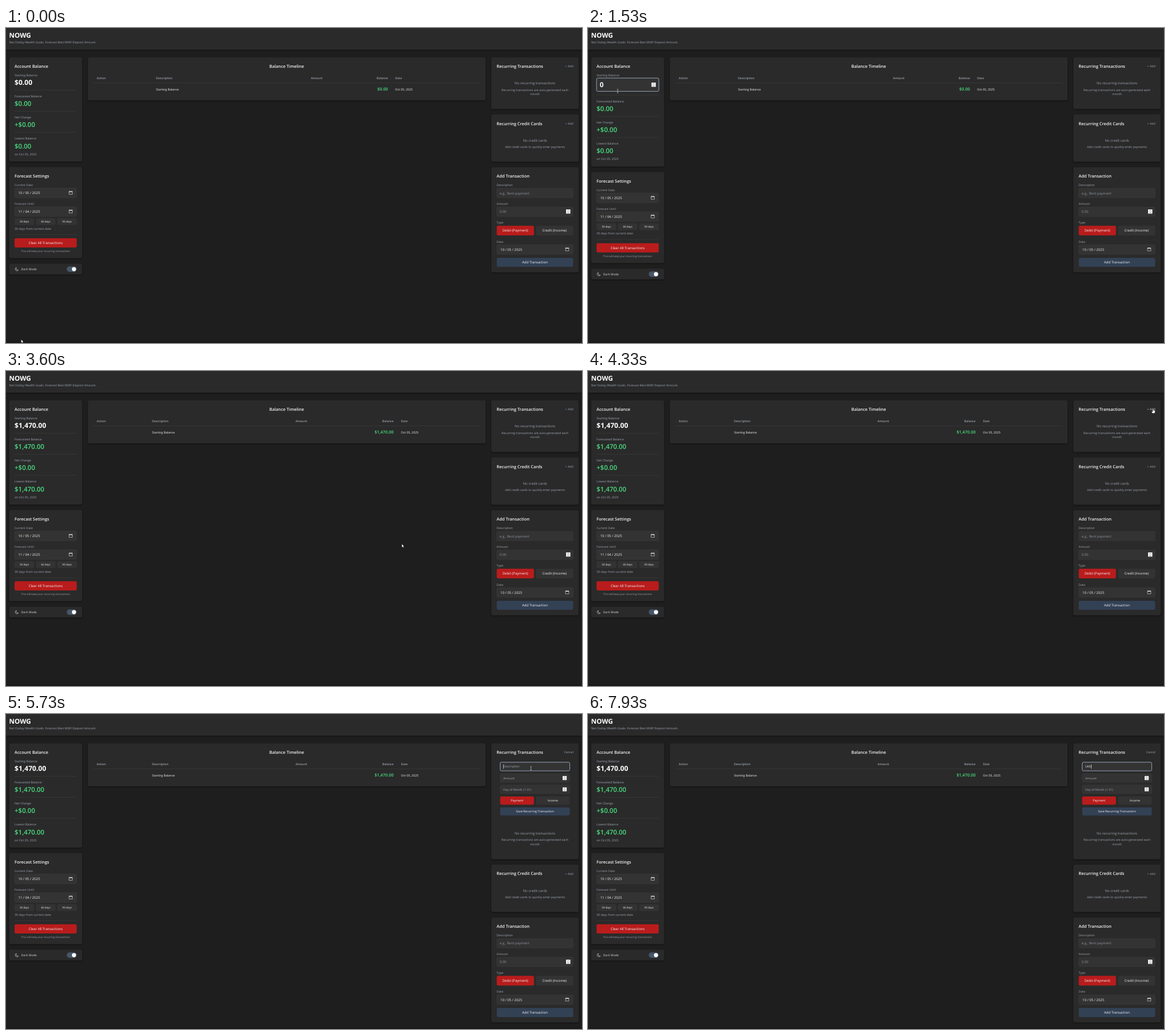
Animation, 1010 px wide and 554 px high, one loop 8 s. Source, as an HTML page:

```html
<!DOCTYPE html>
<html lang="en">
<head>
<meta charset="utf-8">
<title>Balance forecast</title>
<style>
html, body { margin: 0; width: 100%; height: 100%; overflow: hidden; background: #1e1e1e; }
svg { display: block; width: 100%; height: 100%; }
text { font-family: "Open Sans", "Noto Sans", sans-serif; text-rendering: geometricPrecision; white-space: pre; }
.card { fill: #2a2a2a; filter: drop-shadow(0 1.2px 1.2px rgba(0, 0, 0, .5)); }
</style>
</head>
<body>
<svg id="stage" viewBox="0 0 1010 554"></svg>
<script>
const LOOP = 8000;
const GRAY = '#9ca3af', WHITE = '#f3f4f6', GREEN = '#4ade80', RED = '#b91c1c',
      SLATE = '#334155', FIELD = '#333333', LINE = '#404040', RING = '#94a3b8';
const XS = 4.6, SM = 5.3, MD = 6, LG = 7.4;

const text = (x, y, s, size = SM, fill = GRAY, weight = 400, anchor = 'start') =>
  `<text x="${x}" y="${y}" font-size="${size}" fill="${fill}" font-weight="${weight}" text-anchor="${anchor}">${s}</text>`;
const mid = (x, y, s, size, fill, weight) => text(x, y, s, size, fill, weight, 'middle');
const end = (x, y, s, size, fill, weight) => text(x, y, s, size, fill, weight, 'end');
const title = (x, y, s) => text(x, y, s, LG, WHITE, 600);
const rect = (x, y, w, h, fill, r = 2.4, extra = '') =>
  `<rect x="${x}" y="${y}" width="${w}" height="${h}" rx="${r}" fill="${fill}" ${extra}/>`;
const card = (x, y, w, h) => `<rect class="card" x="${x}" y="${y}" width="${w}" height="${h}" rx="3"/>`;
const rule = (x, y, w) => rect(x, y, w, .5, LINE, 0);
const field = (x, y, w, h, focus) =>
  rect(x, y, w, h, FIELD, 2.2, focus ? `stroke="${RING}" stroke-width="1"` : `stroke="${LINE}" stroke-width=".4"`);
const button = (x, y, w, h, fill, s, size = MD) =>
  rect(x, y, w, h, fill) + mid(x + w / 2, y + h / 2 + size * .36, s, size, WHITE);
const group = (dy, s) => `<g transform="translate(0 ${dy})">${s}</g>`;
const path = (d, attrs) => `<path d="${d}" ${attrs}/>`;
const caret = (x, y, h) => rect(x, y, .6, h, '#fff', 0);

const spinner = (x, y, s = 7.6) => rect(x, y, s, s, '#f1f1f1', .6) +
  path(`M${x + s * .3} ${y + s * .38}l${s * .2} ${-s * .2} ${s * .2} ${s * .2}m0 ${s * .24}l${-s * .2} ${s * .2} ${-s * .2} ${-s * .2}`,
    'fill="none" stroke="#555" stroke-width=".7"');
const calendar = (x, y) =>
  path(`M${x} ${y + 1}h5.8v5h-5.8zM${x + 1.3} ${y}v1M${x + 4.5} ${y}v1`, 'fill="none" stroke="#e5e7eb" stroke-width=".6"') +
  rect(x, y + .8, 5.8, 1.2, '#e5e7eb', 0);
const dateField = (x, y, w, date) =>
  field(x, y, w, 17, false) + text(x + 6.5, y + 10.8, date, MD, WHITE) + calendar(x + w - 13.4, y + 5);

const pointers = {
  arrow: path('M0 0V6.4L1.5 5.1 2.5 7.3 3.5 6.9 2.6 4.7H4.5Z', 'fill="#fff" stroke="#000" stroke-width=".5"'),
  hand: path('M-.8 .7Q0 -.5 .8 .7V3.1L3.4 3.8Q4 4.1 3.7 5.6L2.8 8.6H-1L-3 5.4Q-2.6 4.3 -.8 5.6Z',
    'fill="#fff" stroke="#000" stroke-width=".5"'),
  beam: path('M-1.3 -3.2Q0 -3.2 0 -2.5Q0 -3.2 1.3 -3.2M0 -2.5V2.5M-1.3 3.2Q0 3.2 0 2.5Q0 3.2 1.3 3.2',
    'fill="none" stroke="#ddd" stroke-width=".6"'),
};

// Pointer trips: each is a list of [ms, x, y]
const trips = [
  [[0, 26.5, 547.5], [130, 32, 480], [330, 60, 180], [530, 69, 32], [800, 56, 94], [930, 54, 98], [1270, 52, 111], [1800, 52, 111]],
  [[3130, 70, 116], [3400, 643, 300], [3530, 690, 306], [3600, 694, 304], [3930, 955, 91],
   [4130, 978, 74], [4330, 990.8, 66], [5200, 990.8, 66], [5470, 950, 84], [5730, 920.5, 95.5], [6330, 920.5, 95.5]],
];

function pointer(t) {
  const trip = trips.find(p => t >= p[0][0] && t < p[p.length - 1][0]);
  if (!trip) return '';
  const i = trip.findIndex(p => p[0] > t);
  const [t0, x0, y0] = trip[i - 1], [t1, x1, y1] = trip[i];
  const k = (t - t0) / (t1 - t0), x = x0 + (x1 - x0) * k, y = y0 + (y1 - y0) * k;
  const kind = t < 730 ? 'arrow' : t < 930 ? 'hand' : t < 1800 ? 'beam'
    : t < 4200 ? 'arrow' : t < 5270 ? 'hand' : t < 5470 ? 'arrow' : 'beam';
  return `<g transform="translate(${x} ${y})">${pointers[kind]}</g>`;
}

const typed = (t, steps) => steps.reduce((s, [at, v]) => t >= at ? v : s, '');
const within = (t, spans) => spans.some(([a, b]) => t >= a && t < b);

function account(t, editing, money) {
  let s = card(5.5, 51.5, 128, editing ? 192.3 : 183.5) +
    title(15, 69.8, 'Account Balance') + text(15, 84.7, 'Starting Balance');
  if (editing) {
    const value = typed(t, [[930, '0'], [1870, ''], [2130, '1'], [2400, '14'], [2530, '147'], [2730, '1470']]);
    s += field(15, 88, 109.2, 23.4, true) + text(20.4, 104.3, value, 12.1, WHITE, 700) + spinner(111.3, 96);
    if (within(t, [[930, 1530], [1800, 3270]])) s += caret(20.6 + value.length * 6.9, 91.5, 16);
  } else s += text(15, 100.2, money, 12.1, '#fff', 700);

  const block = (y, label, value) => rule(15, y, 109) + text(15, y + 12.9, label) + text(15, y + 28, value, 11.5, GREEN, 600);
  return s + group(editing ? 8.8 : 0,
    block(109, 'Forecasted Balance', money) + block(146.3, 'Net Change', '+$0.00') +
    block(183.5, 'Lowest Balance', money) + text(15, 223.6, 'on Oct 05, 2025') + settings());
}

const settings = () =>
  card(5.5, 244.5, 128, 160.3) + title(15, 263, 'Forecast Settings') +
  text(15, 277.9, 'Current Date') + dateField(15, 281.5, 109, '10 / 05 / 2025') +
  text(15, 310.8, 'Forecast Until') + dateField(15, 314.3, 109, '11 / 04 / 2025') +
  [30, 60, 90].map((d, i) => button(15 + 37.4 * i, 334.6, 34.4, 12, FIELD, d + ' days', XS)).join('') +
  text(15, 354.7, '30 days from current date') + rule(15, 363, 109) +
  button(15, 369.8, 109, 16.2, RED, 'Clear All Transactions') +
  mid(69.5, 394.1, 'This will keep your recurring transactions', 4.5) +
  card(5.5, 414.5, 128, 19) +
  path('M18.2 421.2A3 3 0 1 0 21.8 425.5A3 3 0 0 1 18.2 421.2Z', 'fill="none" stroke="#d1d5db" stroke-width=".7"') +
  text(26.5, 426.3, 'Dark Mode', SM, '#d1d5db') +
  rect(106.5, 419.3, 17.5, 9.6, '#475569', 4.8) + '<circle cx="119.2" cy="424.1" r="3.6" fill="#fff"/>';

function timeline(saved, money) {
  const desc = saved ? 256 : 263, amount = saved ? 528 : 555, bal = saved ? 679.6 : 669.8, date = saved ? 692.5 : 682.3;
  const head = (f, x, s) => f(x, 89.7, s, 5.2, GRAY, 600);
  return card(143.5, 51.5, 697.5, 75.7) + mid(492.2, 69.8, 'Balance Timeline', LG, WHITE, 600) +
    head(text, 159, 'Action') + head(text, desc, 'Description') + head(end, amount, 'Amount') +
    head(end, bal, 'Balance') + head(text, date, 'Date') + rule(152.5, 96.5, 679) +
    text(desc, 109.5, 'Starting Balance', SM, WHITE) + end(bal, 110, money, 7.35, GREEN, 600) +
    text(date, 109.5, 'Oct 05, 2025', SM, WHITE);
}

function form(t) {
  const focus = t >= 5670;
  const value = typed(t, [[6400, 'U'], [7530, 'Ut'], [7600, 'Uti'], [7730, 'Util'], [7930, 'Utili']]);
  const row = (y, hint) => field(866.5, y, 122, 15.2, false) + text(872, y + 9.6, hint) + spinner(976, y + 4, 7.2);
  let s = field(866.5, 84.8, 122, 15.2, focus) +
    (value ? text(872, 94.4, value, SM, WHITE) : text(872, 94.4, 'Description'));
  if (within(t, [[5670, 6330], [6400, 6930], [7470, LOOP]])) {
    const x = [871.9, 876.1, 878, 879.3, 880.7, 882][value.length];
    s += caret(x, 88.8, 7.6);
  }
  return s + row(105, 'Amount') + row(124.9, 'Day of Month (1-31)') +
    button(866.5, 145, 59.3, 14.4, RED, 'Payment', SM) + button(929.2, 145, 59.3, 14.4, FIELD, 'Income', SM) +
    button(866.5, 164.2, 122, 14.3, SLATE, 'Save Recurring Transaction', SM);
}

function sidebar(t) {
  const open = t >= 5000, dy = open ? 112.9 : 0;
  const hover = within(t, [[4200, 5270]]) ? '#cbd5e1' : RING;
  return card(851, 51.5, 153.3, 91 + dy) + title(860.3, 69.8, 'Recurring Transactions') +
    end(994.8, 68.9, open ? 'Cancel' : '+ Add', SM, hover) + (open ? form(t) : '') +
    group(dy,
      mid(927.6, 99, 'No recurring transactions', MD) +
      mid(927.6, 110.5, 'Recurring transactions are auto-generated each') + mid(927.6, 118.4, 'month') +
      card(851, 152, 153.3, 83.3) + title(860.3, 170.6, 'Recurring Credit Cards') + end(994.8, 169.7, '+ Add', SM, RING) +
      mid(927.6, 199.7, 'No credit cards', MD) + mid(927.6, 211.1, 'Add credit cards to quickly enter payments') +
      card(851, 245, 153.3, 184.7) + title(860.3, 263.4, 'Add Transaction') +
      text(860.3, 278.3, 'Description') + field(860.5, 282, 134, 16.6) + text(865.5, 292.5, 'e.g., Rent payment', MD, '#8b919b') +
      text(860.3, 311.1, 'Amount') + field(860.5, 314.8, 134, 16.6) + text(865.5, 325.3, '0.00', MD, '#8b919b') + spinner(982, 319) +
      text(860.3, 343.9, 'Type') + button(860.5, 347.7, 65.3, 17, RED, 'Debit (Payment)') +
      button(929.2, 347.7, 65.3, 17, FIELD, 'Credit (Income)') +
      text(860.3, 377.6, 'Date') + dateField(860.5, 381, 134, '10 / 05 / 2025') +
      button(860.5, 404.2, 134, 15.8, SLATE, 'Add Transaction'));
}

function draw(t) {
  const editing = within(t, [[930, 3600]]), saved = t >= 3600;
  const money = saved ? '$1,470.00' : '$0.00';
  return rect(0, 0, 1010, 554, '#1e1e1e', 0) +
    '<rect class="card" width="1010" height="38.2"/>' +
    text(5.5, 17, 'NOWG', 11.7, '#fff', 700) +
    text(5.5, 27.2, 'Net Outlay Wealth Goals. Forecast Best MMF Deposit Amount.') +
    account(t, editing, money) + timeline(saved, money) + sidebar(t) +
    rect(0, 552.3, 1010, 1.7, '#171717', 0) + pointer(t);
}

const stage = document.getElementById('stage');
let start, last = -1;
function tick(now) {
  start ??= now;
  // The screen refreshes 15 times a second
  const step = Math.floor(((now - start) % LOOP + 4) * .015) % 120;
  if (step !== last) {
    last = step;
    stage.innerHTML = draw(Math.round(step / .15) * 10);
  }
  requestAnimationFrame(tick);
}
requestAnimationFrame(tick);
</script>
</body>
</html>
```
